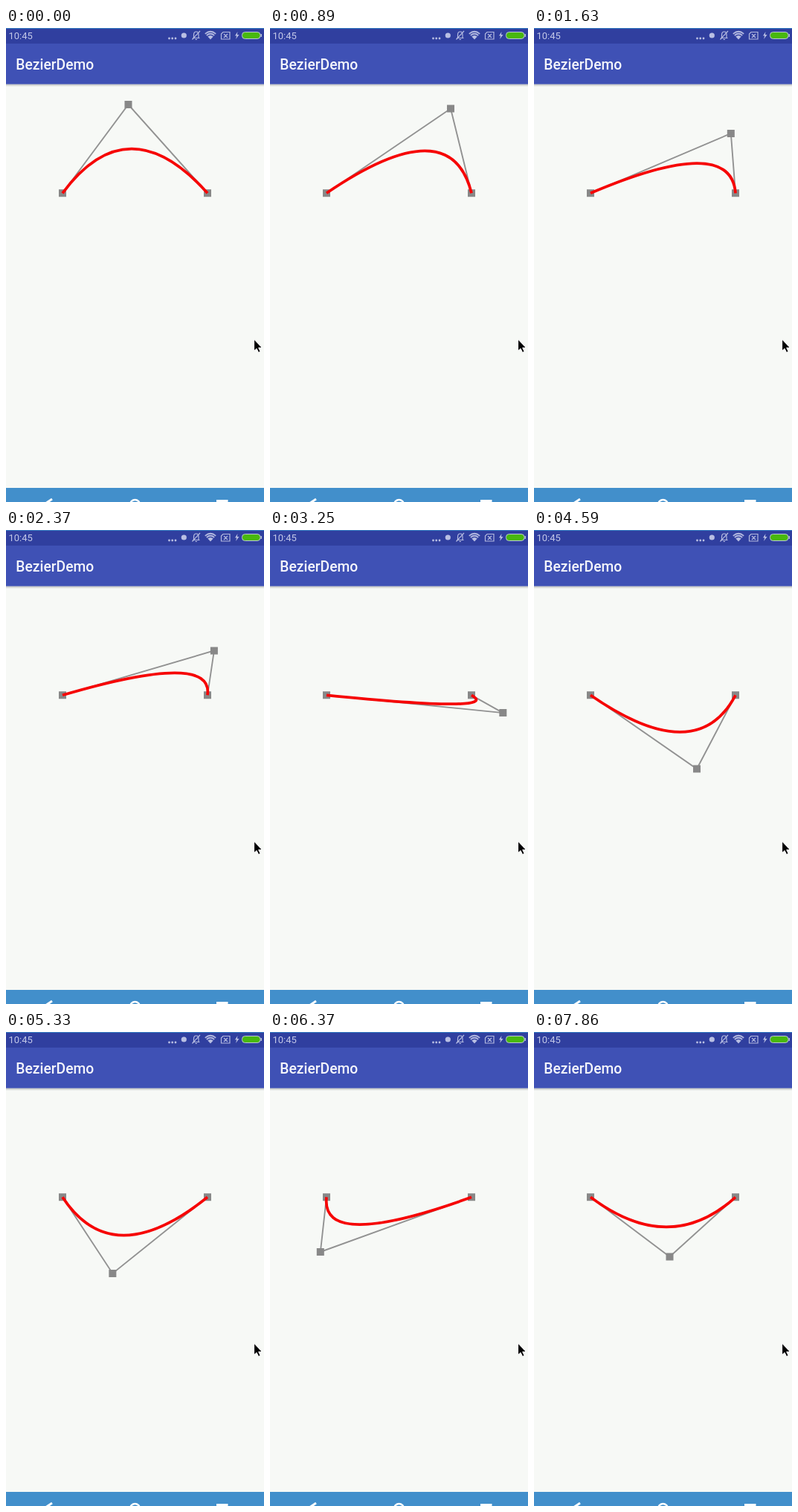
An HTML page for the animation above (8000 ms loop, 347 px wide and 638 px high).

```html
<!DOCTYPE html>
<html lang="en">
<head>
<meta charset="utf-8">
<title>BezierDemo</title>
<style>
  html, body { margin: 0; width: 100%; height: 100%; overflow: hidden; background: #f7f9f6; }
  svg { display: block; width: 347px; height: 638px; }
  text { font-family: Roboto, "Noto Sans", sans-serif; }
  .icon { fill: none; stroke: #b4bae0; stroke-width: 1.2; }
  .solid { fill: #b9bfe3; }
  .guide { fill: none; stroke: #929292; stroke-width: 1.9; }
  .handle { fill: #888; }
  .curve { fill: none; stroke: #f60505; stroke-width: 3.8; }
</style>
</head>
<body>
<svg viewBox="0 0 347 638">
  <defs>
    <linearGradient id="shade" x2="0" y2="1">
      <stop offset="0" stop-color="#000" stop-opacity=".25"/>
      <stop offset="1" stop-color="#000" stop-opacity="0"/>
    </linearGradient>
  </defs>
  <rect width="347" height="638" fill="#f7f9f6"/>
  <rect y="75.5" width="347" height="3.5" fill="url(#shade)"/>
  <rect width="347" height="75.6" fill="#3f51b5"/>
  <rect width="347" height="21" fill="#303f9f"/>
  <rect width="347" height="1" fill="#3b82c4"/>

  <text x="3.5" y="15" font-size="13" fill="#c3c8e8">10:45</text>
  <text x="13.3" y="56.3" font-size="19.3" font-weight="500" fill="#f4f5fb">BezierDemo</text>

  <g class="solid">
    <circle cx="219.5" cy="14" r="1.4"/>
    <circle cx="223.7" cy="14" r="1.4"/>
    <circle cx="228" cy="14" r="1.4"/>
    <circle cx="239.3" cy="10" r="3.6"/>
    <path d="M311.5 5 308 10.5h2.3L309 15l4.5-6h-2.6z"/>
    <path d="M271.3 11.4Q275 8.4 278.7 11.4L275 15.5z"/>
  </g>
  <g class="icon">
    <path d="M251 13.5h9.5M252.5 13.5V9.5Q252.5 5 255.8 5T259 9.5V13.5M254.5 15.5h2.5M250.5 15.5 261 4"/>
    <path d="M267.8 7.8Q275 1.7 282.2 7.8M269.8 10Q275 5.5 280.2 10" stroke-width="1.7"/>
    <path d="M292 5.5h9v9.5h-11.5V8zM293 8l5 5M298 8l-5 5"/>
  </g>
  <rect x="317.5" y="5.5" width="24.5" height="9" rx="4" fill="#48b80e" stroke="#b9c4d6"/>
  <rect x="342.5" y="8" width="1.5" height="4" fill="#b9c4d6"/>

  <path id="guide" class="guide"/>
  <path id="handles" class="handle"/>
  <path id="curve" class="curve"/>

  <path d="M333.6 419v15.6l3.5-3.1 2.5 5.2 2.6-1.2-2.5-5h4.8z" fill="#000" stroke="#fff"/>

  <rect y="619" width="347" height="19" fill="#428fcb"/>
  <g fill="none" stroke="#fff" stroke-width="2.4">
    <path d="M62 634 53 640" stroke-width="3"/>
    <circle cx="173.5" cy="641.5" r="6.5"/>
  </g>
  <rect x="283" y="635" width="15.5" height="3" fill="#fff"/>
</svg>
<script>
  const LOOP = 8000, TICK = 148.1, LEAD = 10;
  const left = [76, 222.3], right = [271, 222.3];

  // each drag glides through evenly timed points, then rests until the next
  const drags = [
    { from: 0, to: 6, path: [[164.5, 103], [243, 108.5]] },
    { from: 7, to: 13, path: [[243, 108.5], [274, 156]] },
    { from: 15, to: 43, path: [[274, 156], [304, 195], [312, 261], [280, 295.3],
                               [219, 321.5], [164, 327], [80, 313], [67.8, 296]] },
    { from: 44, to: 50, path: [[67.8, 296], [97, 318], [169, 304]] },
    { from: 52, to: 53, path: [[169, 304], [182.5, 302.5]] }
  ];

  const get = id => document.getElementById(id);
  const guide = get('guide'), curve = get('curve'), handles = get('handles');

  // Catmull-Rom through the points, p from 0 to 1
  function along(path, p) {
    const last = path.length - 1;
    const i = Math.min(Math.floor(p * last), last - 1), u = p * last - i;
    const at = k => path[Math.max(0, Math.min(last, k))];
    return [0, 1].map(axis => {
      const [a, b, c, d] = [-1, 0, 1, 2].map(k => at(i + k)[axis]);
      return b + u / 2 * (c - a + u * (2 * a - 5 * b + 4 * c - d + u * (3 * (b - c) + d - a)));
    });
  }

  function controlAt(tick) {
    const { from, to, path } = drags.findLast(d => d.from <= tick);
    return along(path, Math.min(1, (tick - from) / (to - from)));
  }

  const square = ([x, y]) => `M${x - 5} ${y - 5}h10v10h-10z`;

  function draw(ms) {
    const c = controlAt(Math.floor((ms % LOOP + LEAD) / TICK));
    guide.setAttribute('d', `M${left}L${c}L${right}`);
    handles.setAttribute('d', [left, c, right].map(square).join(''));
    curve.setAttribute('d', `M${left}Q${c} ${right}`);
  }

  const t0 = performance.now();
  function loop(now) {
    draw(Math.max(0, now - t0));
    requestAnimationFrame(loop);
  }
  draw(0);
  requestAnimationFrame(loop);
</script>
</body>
</html>
```
